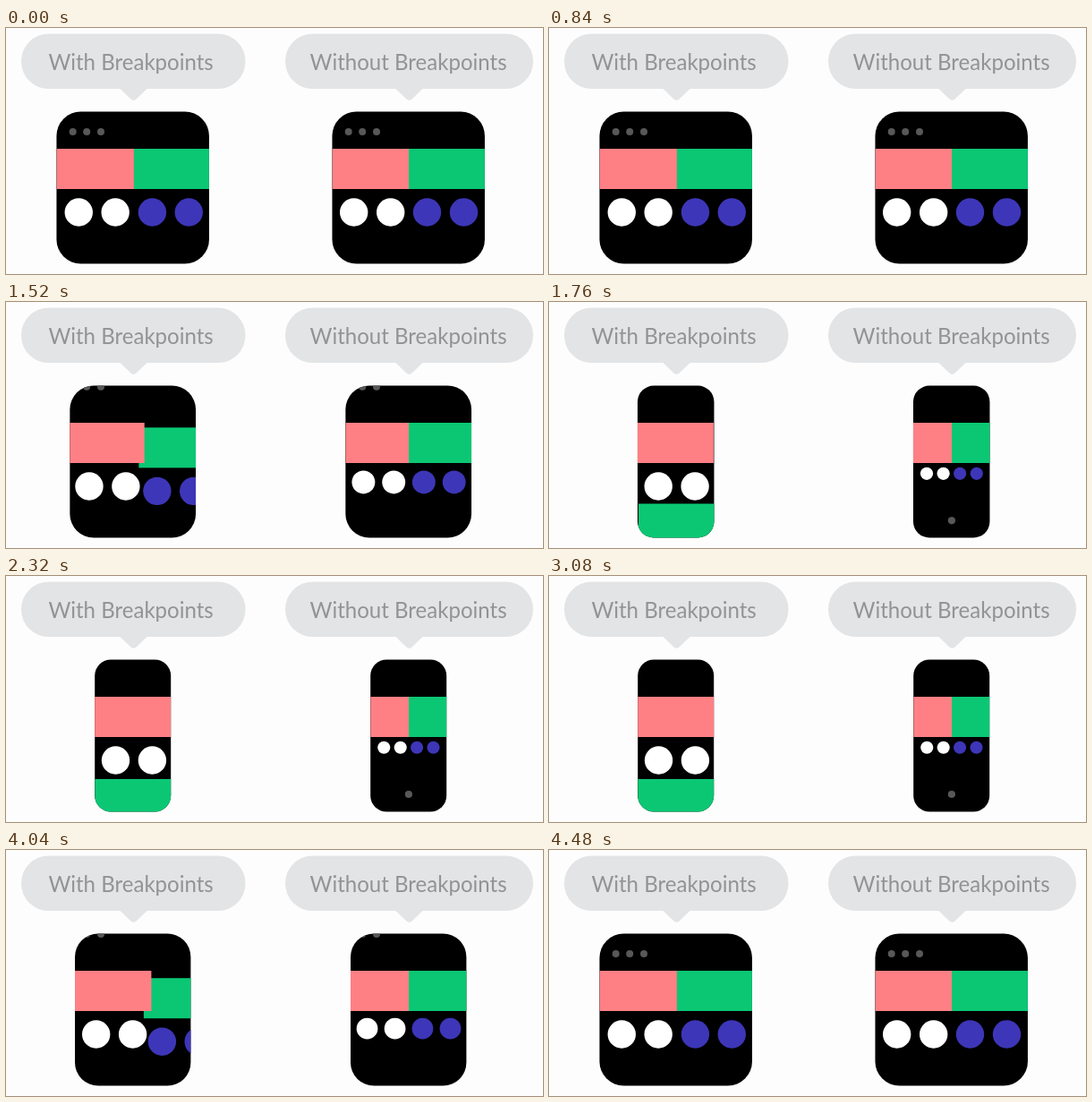
Recreate the animation shown at these times as an HTML page. Size 600 by 275 pixels, loop 4560 ms.

```html
<!DOCTYPE html>
<html lang="en">
<head>
<meta charset="utf-8">
<title>Breakpoints</title>
<style>
  html, body { margin: 0; width: 100%; height: 100%; overflow: hidden; background: #fefdfe; }
  svg { display: block; width: 600px; height: 275px; }
  text { font: 24.05px Lato, "Open Sans", sans-serif; fill: #929394; text-anchor: middle; }
  .bubble { fill: #e3e4e5; }
  .pink { fill: #fe8084; }
  .green { fill: #0bc774; }
  .blue { fill: #3d36b8; }
  .white { fill: #fff; }
  .grey { fill: #585858; }
</style>
</head>
<body>
<svg id="stage" viewBox="0 0 600 275"></svg>
<script>
const LOOP = 4560, STEP = 40;
const WIDE = 170.5, NARROW = 85, TOP = 93.5, TALL = 170;
const BAND = 135, BAND_H = 45, ROW = 206, BALL = 15.7;
const SHRINK = { at: 1330, ms: 455, dotRise: 61, fall: 2.7, slide: 2.1, lag: 3 };
const GROW = { at: 3775, ms: 520, dotRise: 46, fall: 3.3, slide: 3, lag: 0.4 };

const stage = document.getElementById('stage');

function set(node, attrs) {
  for (const key in attrs) node.setAttribute(key, attrs[key]);
  return node;
}

function add(parent, tag, attrs) {
  const node = document.createElementNS('http://www.w3.org/2000/svg', tag);
  return parent.appendChild(set(node, attrs));
}

const band = (parent, cls) => add(parent, 'rect', { class: cls, y: BAND, height: BAND_H });
const ball = (parent, cls, cx, cy, r) => add(parent, 'circle', { class: cls, cx, cy, r });
const move = (node, x, y) => set(node, { transform: `translate(${x} ${y})` });

function bubble(x, width, tail, label, labelX) {
  add(stage, 'rect', { class: 'bubble', x, y: 6.5, width, height: 61.5, rx: 30.5 });
  add(stage, 'path', {
    class: 'bubble',
    d: `M${tail - 16} 67 L${tail - 3} 79.5 Q${tail} 82 ${tail + 3} 79.5 L${tail + 16} 67Z`
  });
  add(stage, 'text', { x: labelX, y: 47 }).textContent = label;
}

// Rounded black body; everything inside is clipped to it.
function device(id, center) {
  const clip = add(stage, 'clipPath', { id });
  const mask = add(clip, 'rect', { y: TOP, height: TALL });
  const inside = add(stage, 'g', { 'clip-path': `url(#${id})` });
  add(inside, 'rect', { width: 600, height: 275 });
  const dots = add(inside, 'g', {});
  for (const dx of [-67, -51.5, -35.7]) ball(dots, 'grey', center + dx, 116, 4);
  const home = ball(inside, 'grey', center + 0.2, 244, 4.1);

  function pose(p, way) {
    const width = WIDE + (NARROW - WIDE) * p;
    const left = center - width / 2;
    set(mask, { x: left, width, rx: 27 - 9 * p ** 3 });
    move(dots, 0, -way.dotRise * p);
    move(home, 0, 60 * (1 - p));
    return { left, width };
  }
  return { inside, pose };
}

// Second column wraps below the first one.
function stacking(center) {
  const { inside, pose } = device('stacking', center);
  const second = add(inside, 'g', {});
  const first = add(inside, 'g', {});
  set(band(second, 'green'), { x: 86.5, width: 86 });
  set(band(first, 'pink'), { x: 0, width: 86.5 });
  for (const x of [24.8, 65.7]) ball(first, 'white', x, ROW, BALL);
  for (const x of [107, 147.8]) ball(second, 'blue', x, ROW, BALL);

  return (p, way) => {
    const { left } = pose(p, way);
    move(first, left - 1.5 * p - way.lag * Math.sin(Math.PI * p), 0);
    move(second, left - 86.5 * p ** way.slide, 92 * p ** way.fall);
  };
}

// Both columns just get smaller.
function squeezing(center) {
  const { inside, pose } = device('squeezing', center);
  const pink = band(inside, 'pink');
  const green = band(inside, 'green');
  const balls = [-61, -20, 20.8, 61.8].map((x, i) => ({
    x, node: ball(inside, i < 2 ? 'white' : 'blue', 0, 0, 0)
  }));

  return (p, way) => {
    const { left, width } = pose(p, way);
    const k = 1 - 0.5 * p - 0.05 * p ** 4;
    set(pink, { x: left, width: width / 2 + 1 });
    set(green, { x: center + 0.3, width: width / 2 + 1 });
    for (const { x, node } of balls) {
      set(node, { cx: center + x * k, cy: 180 + (ROW - 180) * k, r: BALL * k });
    }
  };
}

function ease(t, { at, ms }) {
  const u = Math.min(1, Math.max(0, (t - at) / ms));
  return u < 0.5 ? 2 * u * u : 1 - 2 * (1 - u) ** 2;
}

bubble(17, 250.5, 142.5, 'With Breakpoints', 139.6);
bubble(312, 277, 450.5, 'Without Breakpoints', 449.6);
const devices = [stacking(141.7), squeezing(449.7)];
const start = performance.now();

function draw(now) {
  const time = Math.max(0, now - start) % LOOP;
  const t = Math.min(LOOP - 2 * STEP, Math.floor(time / STEP) * STEP);
  const p = ease(t, SHRINK) - ease(t, GROW);
  const way = t < GROW.at ? SHRINK : GROW;
  for (const update of devices) update(p, way);
  requestAnimationFrame(draw);
}
draw(start);
</script>
</body>
</html>
```
